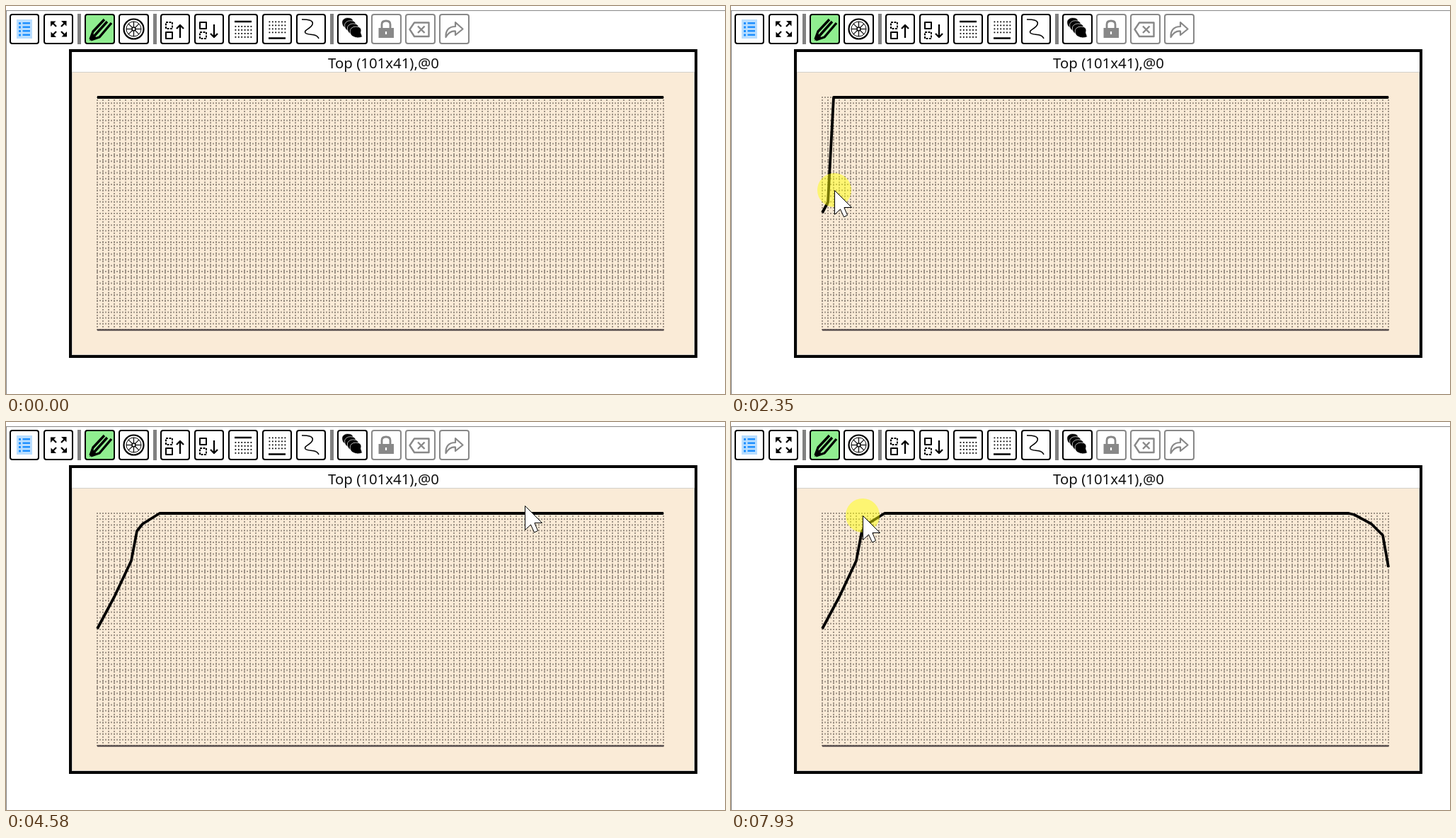
An HTML page for the animation above (8 s loop, 1016x548 px).

```html
<!DOCTYPE html>
<html>
<head>
<meta charset="utf-8">
<style>
  html, body { margin: 0; width: 100%; height: 100%; overflow: hidden; background: #fff; }
  svg { display: block; }
  text { font: 20.4px "Noto Sans", sans-serif; }
</style>
</head>
<body>
<svg id="stage" width="1016" height="548" viewBox="0 0 1016 548" fill="none">
  <path d="M0 6.5H1016M.5 6V548" stroke="#888"/>
  <g id="toolbar"></g>
  <rect x="91" y="63" width="884" height="432" fill="#fff" stroke="#000" stroke-width="4"/>
  <rect x="93.5" y="93.5" width="879" height="399" fill="#faebd7" stroke="#d3d0cb"/>
  <text x="533.5" y="88" text-anchor="middle" fill="#111">Top (101x41),@0</text>
  <path id="grid" stroke="#3c322d" stroke-opacity=".48" stroke-width="2" stroke-dasharray="2 2"/>
  <path d="M129 457.5H929.5" stroke="#574e4e" stroke-width="2.5"/>
  <path id="profile" stroke="#000" stroke-width="3.8" stroke-linejoin="round"/>
  <g id="pointer">
    <circle id="press" r="24" fill="#ff0" fill-opacity=".47"/>
    <path d="M.5 .5V34.5L8.5 27L13.5 38L18.5 35.5L14 25V24.5H24.5Z" fill="#fff" stroke="#000"/>
  </g>
</svg>
<script>
const $ = id => document.getElementById(id);
const range = n => [...Array(n).keys()];
const mix = (a, b, k) => a + (b - a) * k;

// Toolbar icons, each in a local 42 x 43 box
const GRAY = '#888';
const box = (x, y, w, h) => `M${x} ${y}h${w}v${h}h${-w}z`;
const fill = (d, color = '#000') => `<path d="${d}" fill="${color}"/>`;
const line = (d, width = 2, color = '#000', extra = '') =>
  `<path d="${d}" stroke="${color}" stroke-width="${width}" stroke-linejoin="round" ${extra}/>`;
const turned = (n, art) =>
  range(n).map(i => `<g transform="rotate(${i * 360 / n} 21.5 21.5)">${art}</g>`).join('');
const ring = (r, width) => `<circle cx="21.5" cy="21.5" r="${r}" stroke="#000" stroke-width="${width}"/>`;
const dots = top => fill(range(24).map(i => box(9.5 + i % 6 * 4.4, top + (i / 6 | 0) * 5, 1.8, 1.8)).join(''));
const squares = (dashedY, solidY) =>
  line(box(8, dashedY, 9, 9), 2, '#000', 'stroke-dasharray="3 1.5"') + line(box(8, solidY, 9, 9));

const list = fill(box(10, 8, 22, 27), '#b9deff') +
  fill(range(4).map(i => box(13, 12 + i * 5.5, 3, 3) + box(18.5, 12 + i * 5.5, 10.5, 2.5)).join(''), '#1e90ff');
const expand = turned(4, line('M18 18L12.5 12.5', 2.3) + fill('M10 10.5H17.5L10 18Z'));
const pencil = line('M8 36L12 25L28 8M14 31L32 11M9 37L21 33L38 13', 3.4) + fill('M7 38L11 27L17 34Z');
const wheel = ring(14, 2.2) + ring(10.5, 1) + ring(2.5, 1.6) + turned(8, line('M21.5 18.5V11', 1.2));
const stack = range(4).map(i => `<g transform="translate(${i * 3.8} ${i * 4.2})">` +
  `<path d="M7 10Q10 4 19 6Q24 8 22 14L24 20Q17 23 10 19Q6 16 7 10Z" fill="#000" stroke="#fff" stroke-width=".7"/></g>`).join('');
const lock = fill(box(10.5, 20, 21.5, 14), GRAY) + line('M15 20V15Q15 10 21 10T27 15V20', 2.8, GRAY) +
  line('M21 25V29', 2.2, '#fff');
const erase = line('M6.5 22L13 12.5H33.5V32H13ZM18 17.5L27.5 27M27.5 17.5L18 27', 2.4, GRAY);
const share = line('M9.5 33C9 23 14 18 23 18V12L33.5 21.5L23 30V24.5C17 24 13 27 9.5 33Z', 2.2, GRAY);

const groups = [
  { x: 5, width: 42, icons: [list, expand] },
  { x: 111, width: 43, icons: [pencil, wheel] },
  { x: 218, width: 42, icons: [
    squares(12, 26) + line('M28 34V16M23 21L28 16L33 21', 2.3),
    squares(26, 12) + line('M28 15V33M23 28L28 33L33 28', 2.3),
    line('M9 11H33', 2.5) + dots(17),
    dots(10.5) + line('M9 34.5H33', 2.5),
    line('M8 8C17 8 25 9 23 15C21 21 10 23 13 27C17 31 29 27 32 35', 1.6),
  ] },
  { x: 468, width: 43, icons: [stack, lock, erase, share] },
];
$('toolbar').innerHTML = groups.map(({ x, width, icons }, g) =>
  (g ? fill(box(x - 10, 11, 5, 43), '#808080') : '') +
  icons.map((art, i) => `<g transform="translate(${x + i * 48} 11)">
    <rect x="1" y="1" width="${width - 2}" height="41" rx="3" stroke-width="2"
      fill="${art === pencil ? '#90ee90' : '#fff'}"
      stroke="${art.includes(GRAY) ? GRAY : '#000'}"/>${art}</g>`).join('')).join('');

// Editing grid: 101 x 41 points
const LEFT = 129, TOP = 129, DX = 8, DY = 8.2;
$('grid').setAttribute('d',
  range(41).map(i => `M${LEFT - 1} ${TOP + i * DY}h802`).join('') +
  range(101).map(i => `M${LEFT + i * DX} ${TOP - 1}v330`).join(''));

// Linear interpolation through [position, value] points, held at both ends
function along(points, at) {
  const i = points.findIndex(p => p[0] > at);
  if (i < 1) return points.at(i)[1];
  const [a, va] = points[i - 1], [b, vb] = points[i];
  return mix(va, vb, (at - a) / (b - a));
}

// The hand's route across the grid (x to y) and its pace (time to x)
const route = [
  [116, 322], [129, 292], [153, 247], [177, 196], [185, 154], [193, 144], [217, 129],
  [247, 116], [864, 118], [881, 131], [905, 144], [921, 160], [929, 205],
];
const pace = [
  [1810, 116], [2350, 146], [3420, 200], [3570, 217], [3750, 247], [4030, 247],
  [4730, 864], [5050, 866], [5440, 906], [5600, 911], [6150, 948],
];
const LAG = 150;

// Free pointer moves before and after drawing
const enter = { start: 150, end: 1000, from: [760, 530], to: [107, 311], lift: 190 };
const settle = { start: 1020, end: 1330, from: enter.to, to: [116, 322] };
const back = { start: 6230, end: 6760, from: [948, 205], to: [442, 172] };
const cross = { start: 6760, end: 7000, from: back.to, to: [217, 146] };
const rise = { start: 7150, end: 7470, from: cross.to, to: [217, 131] };
const grab = { start: 7620, end: 7930, from: rise.to, to: [186, 132] };
const glides = [enter, settle, back, cross, rise, grab];

function pointerAt(t) {
  if (t >= pace[0][0] && t < back.start) {
    const x = along(pace, t);
    return [x, along(route, x)];
  }
  const { start, end, from, to, lift = 0 } = glides.findLast(g => g.start <= t) ?? enter;
  const k = Math.min(1, Math.max(0, (t - start) / (end - start)));
  const eased = k * k * (3 - 2 * k);
  return [mix(from[0], to[0], eased), mix(from[1], to[1], eased) - lift * Math.sin(Math.PI * eased)];
}

const isPressed = t => t >= 1640 && t < 4030 || t >= 4900 && t < back.start || t >= grab.start;

// Columns already passed take the height of the route, never above the top row
function profileAt(t) {
  const reach = along(pace, t - LAG);
  return 'M' + range(101).map(i => {
    const x = LEFT + i * DX;
    return `${x} ${x > reach ? TOP : Math.max(TOP, along(route, x))}`;
  }).join('L');
}

function draw(now) {
  const t = now % 8000;
  const [x, y] = pointerAt(t).map(Math.round);
  $('pointer').setAttribute('transform', `translate(${x} ${y})`);
  $('pointer').style.display = t < enter.start ? 'none' : '';
  $('press').style.display = isPressed(t) ? '' : 'none';
  $('profile').setAttribute('d', profileAt(t));
  requestAnimationFrame(draw);
}
requestAnimationFrame(draw);
</script>
</body>
</html>
```
